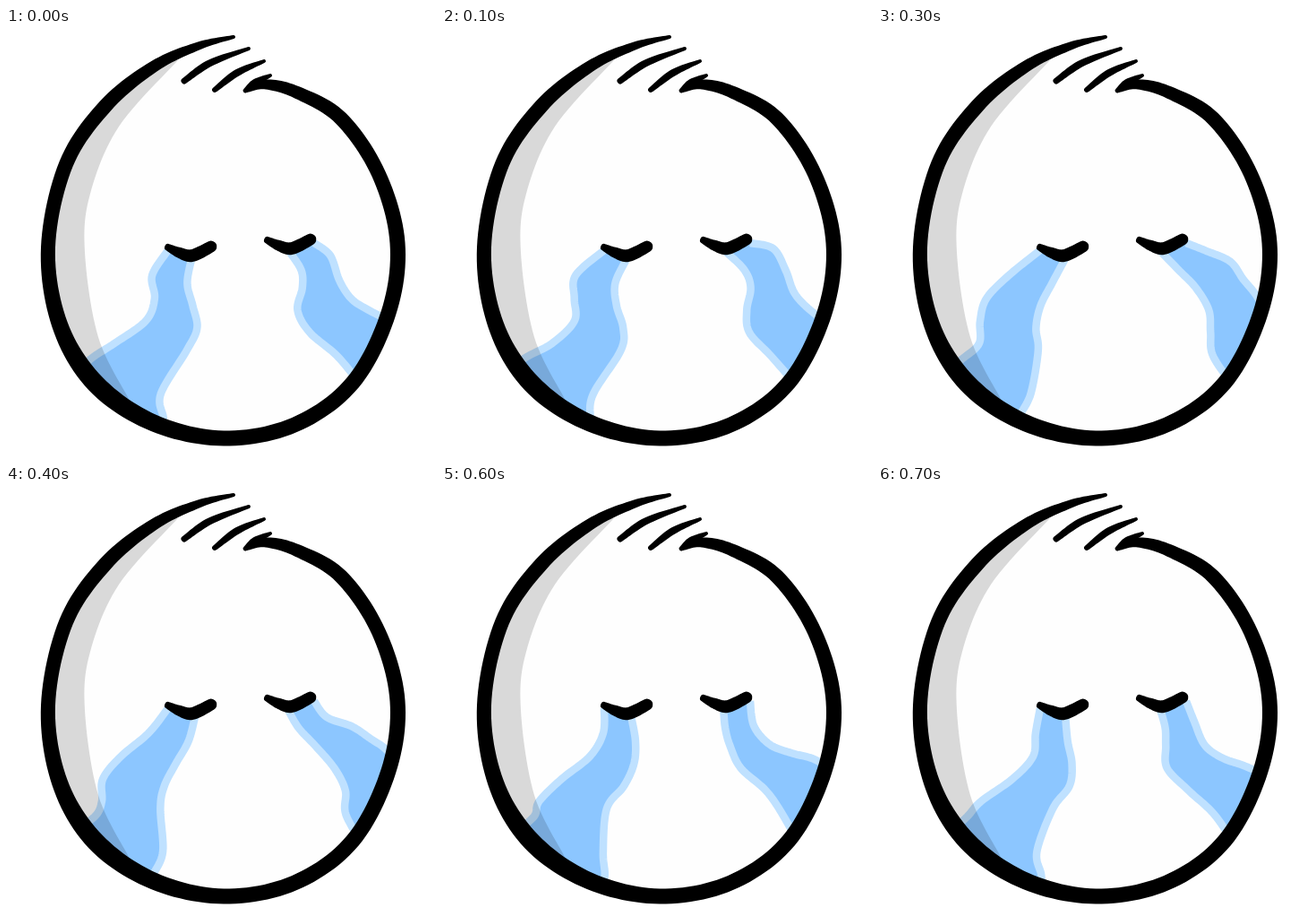
Write an HTML page that moves like this. It is 480 by 480 pixels and loops after 0.8 s.

```html
<!DOCTYPE html>
<html lang="en">
<head>
<meta charset="utf-8">
<title>Crying face</title>
<style>
  html, body { margin: 0; width: 100%; height: 100%; overflow: hidden; background: #fff; }
  svg { display: block; width: 100vw; height: 100vh; }
  .water { fill: #8cc6ff; }
  .bank { fill: none; stroke: #bfe1ff; stroke-width: 8.5; }
</style>
</head>
<body>
<svg viewBox="0 0 480 480">
  <defs><clipPath id="inside"><path id="face"/></clipPath></defs>
  <g clip-path="url(#inside)">
    <rect width="480" height="480" fill="#fefefe"/>
    <path class="water" id="waterL"/>
    <path class="bank" id="bankL"/>
    <path class="water" id="waterR"/>
    <path class="bank" id="bankR"/>
    <path id="shade" opacity=".145"/>
  </g>
  <g id="ink"></g>
</svg>
<script>
const STEP = 100, COUNT = 8;
const set = (id, d) => document.getElementById(id).setAttribute('d', d);
const line = pts => pts.map(p => p.slice(0, 2).map(v => v.toFixed(2)).join()).join('L');

// Dense points on a smooth curve through the keys, any number of values per key
function smooth(keys, parts = 12) {
  const at = i => keys[Math.max(0, Math.min(keys.length - 1, i))];
  const out = [];
  for (let i = 0; i < keys.length - 1; i++) {
    const [a, b, c, d] = [-1, 0, 1, 2].map(k => at(i + k));
    for (let n = 0; n < parts; n++) {
      const u = n / parts;
      out.push(b.map((v, k) => v + u / 2 * (c[k] - a[k]
        + u * (2 * a[k] - 5 * v + 4 * c[k] - d[k]
        + u * (3 * (v - c[k]) + d[k] - a[k])))));
    }
  }
  return [...out, keys[keys.length - 1]];
}

// A brush stroke through keys of x, y, width
function brush(keys) {
  const pts = smooth(keys);
  const side = sign => pts.map(([x, y, w], i) => {
    const p = pts[Math.max(0, i - 1)], q = pts[Math.min(pts.length - 1, i + 1)];
    const dx = q[0] - p[0], dy = q[1] - p[1];
    const r = sign * w / 2 / Math.hypot(dx, dy);
    return [x - dy * r, y + dx * r];
  });
  const one = side(1), two = side(-1).reverse();
  const cap = (key, to) => `A${key[2] / 2},${key[2] / 2} 0 0 0 ${to}`;
  const path = document.createElementNS('http://www.w3.org/2000/svg', 'path');
  path.setAttribute('d', `M${line(one)}${cap(keys[keys.length - 1], two[0])}`
    + `L${line(two)}${cap(keys[0], one[0])}Z`);
  document.getElementById('ink').append(path);
}

const outline = [
  [254, 10, 4], [215, 20, 9], [165, 43, 13], [111, 87, 16], [67, 152, 16], [47, 245, 16],
  [60, 331, 18], [100, 397, 21], [165, 441, 19], [243, 458, 17], [322, 443, 17], [387, 396, 17],
  [427, 318, 17], [437, 240, 17], [416, 163, 16], [374, 101, 16], [325, 72, 14], [290, 63, 11],
  [269, 70, 4]
];
const eye = [[181, 245, 8], [194, 251, 12], [208, 254, 14], [229, 244, 13]];

brush(outline);
brush([[199, 59, 7], [228, 39, 8], [271, 23, 4]]);
brush([[233, 69, 6], [258, 50, 8], [288, 37, 4]]);
brush([[267, 70, 5], [278, 61, 8], [295, 53, 4]]);
brush(eye);
brush(eye.map(([x, y, w]) => [x + 111, y - 8, w]));

set('face', `M${line(smooth(outline))}Z`);
set('shade', `M${line(smooth([[192, 36], [126, 110], [94, 185], [88, 250], [103, 345], [137, 414]]))}`
  + 'V470H20V36Z');

// Keys of x, y, sway: a wave runs down each bank away from the eye
const bank = (keys, lift = 0) => beat => smooth(keys.map(([x, y, sway]) => {
  const delay = 1.1 + Math.hypot(x - keys[0][0], y - keys[0][1]) / 33;
  const move = sway * Math.cos(2 * Math.PI * (beat - delay) / COUNT);
  return [x + move, y + lift * move];
}));

const tears = {
  L: [
    bank([[181, 248, 0], [161, 276, -19], [147, 302, -26], [132, 327, -24], [114, 352, -9], [97, 369, 6], [74, 388, 6]]),
    bank([[209, 258, -3], [203, 285, -13], [199, 310, -18], [195, 335, -20], [187, 360, -15], [174, 408, 6], [170, 434, 13], [169, 450, 13]]),
    '90,460'
  ],
  R: [
    bank([[315, 249, 1], [328, 270, 12], [338, 290, 18], [346, 315, 24], [359, 340, 20], [375, 367, 7], [402, 406, 0]]),
    bank([[344, 240, 0], [360, 256, 12], [379, 275, 15], [396, 292, 12], [415, 305, 10], [434, 322, 6]], -1),
    '460,420'
  ]
};

function draw(beat) {
  for (const [side, [first, second, corner]] of Object.entries(tears)) {
    const a = first(beat), b = second(beat);
    set('water' + side, `M${line(a)}L${corner}L${line([...b].reverse())}Z`);
    set('bank' + side, `M${line(a)}M${line(b)}`);
  }
}

const start = performance.now();
let shown = -1;
function tick() {
  const beat = Math.floor((performance.now() - start) / STEP) % COUNT;
  if (beat !== shown) draw(shown = beat);
  requestAnimationFrame(tick);
}
tick();
</script>
</body>
</html>
```
